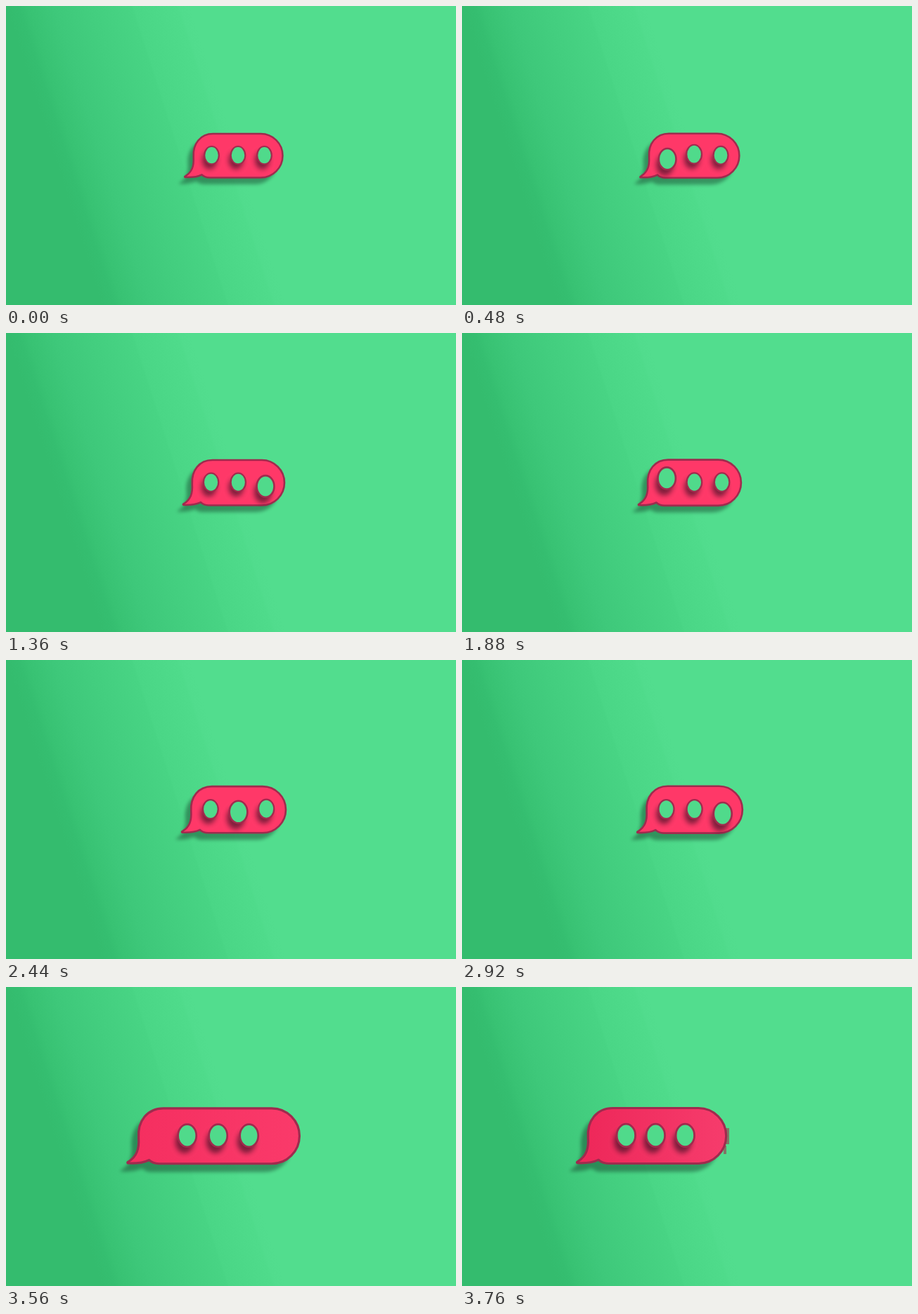
Animation, 640 px wide and 426 px high, one loop 5720 ms. Source, as an HTML page with a canvas:

```html
<!DOCTYPE html>
<html lang="en">
<head>
<meta charset="utf-8">
<title>Typing bubble</title>
<style>
  html, body { margin: 0; width: 100%; height: 100%; overflow: hidden; background: #52dd8e; }
  canvas { display: block; width: 100%; height: 100%; }
</style>
</head>
<body>
<canvas id="stage" width="640" height="426"></canvas>
<script>
const ctx = document.getElementById('stage').getContext('2d');
const LOOP = 5720, STEP = 40, END = 3760;

// Bubble pose: left, right, centre y, scale, dot gap, dot scale, shade
const times = [0, 3000, 3360, 3600, END];
const poses = [
  [266.5, 393.5, 213.3, 1, 37.5, 1, 0],
  [262.3, 399, 213.2, 1.073, 40.2, 1.07, 0],
  [244.3, 407.6, 213.2, 1.17, 44, 1.22, 0],
  [183, 418, 212.2, 1.27, 44, 1.27, 0.7],
  [179, 375.7, 212, 1.265, 42, 1.28, 1]
];

const backdrop = makeBackdrop();

function makeBackdrop() {
  const lean = 0.32, reach = 262, n = reach / (1 + lean * lean);
  const g = ctx.createLinearGradient(0, 0, n, -n * lean);
  const stops = [
    [0, 52, 188, 110], [18, 53, 190, 112], [30, 56, 194, 115],
    [68, 62, 200, 122], [120, 67, 206, 127], [178, 72, 212, 132],
    [181, 74, 214, 134], [243, 79, 219, 139], [247, 81, 220, 141],
    [reach, 82, 221, 142]
  ];
  for (const [u, r, gr, b] of stops) g.addColorStop(u / reach, `rgb(${r},${gr},${b})`);
  return g;
}

// Monotone cubic between poses; the first stretch is linear
function poseAt(t) {
  let i = 0;
  while (i < times.length - 2 && t >= times[i + 1]) i++;
  const span = times[i + 1] - times[i];
  const p = Math.min(1, (t - times[i]) / span);
  const slope = (j, k) => (poses[j + 1][k] - poses[j][k]) / (times[j + 1] - times[j]);
  const tangent = (j, k) => {
    if (j === 0 || j === times.length - 1) return slope(Math.min(j, times.length - 2), k);
    const a = slope(j - 1, k), b = slope(j, k);
    return a * b <= 0 ? 0 : 2 * a * b / (a + b);
  };
  return poses[i].map((a, k) => {
    const b = poses[i + 1][k];
    if (i === 0) return a + (b - a) * p;
    const q = 1 - p;
    return a * (1 + 2 * p) * q * q + b * p * p * (3 - 2 * p)
      + span * (tangent(i, k) * p * q * q - tangent(i + 1, k) * p * p * q);
  });
}

const ease = p => (1 - Math.cos(Math.PI * Math.max(0, Math.min(1, p)))) / 2;

// Each dot hops up, dips down and settles, 400 ms after its neighbour
function hop(t, i) {
  if (t >= 3200) return { dy: 0, grow: 0 };
  const c = (t - i * 400 + 1600) % 1600;
  if (t < i * 400) return { dy: 0, grow: 0 };
  const up = ease(c / 240), down = ease((c - 240) / 280), rest = ease((c - 520) / 240);
  return { dy: -6 * up + 12 * down - 6 * rest, grow: 0.18 * (up - rest) };
}

function setShadow(color, blur, x, y) {
  ctx.shadowColor = color;
  ctx.shadowBlur = blur;
  ctx.shadowOffsetX = x;
  ctx.shadowOffsetY = y;
}

const noShadow = () => setShadow('transparent', 0, 0, 0);

function bubblePath(l, r, cy, s) {
  const h = 31.2 * s;
  const x = v => l + v * s, y = v => cy + v * s;
  ctx.beginPath();
  ctx.moveTo(x(28), cy - h);
  ctx.lineTo(r - h, cy - h);
  ctx.arc(r - h, cy, h, -Math.PI / 2, Math.PI / 2);
  ctx.lineTo(x(23), cy + h);
  ctx.quadraticCurveTo(x(16), y(31), x(12), y(27));
  ctx.bezierCurveTo(x(6), y(30), x(-4), y(31), x(-12), y(30.6));
  ctx.quadraticCurveTo(x(-13), y(29.6), x(-11), y(28.8));
  ctx.bezierCurveTo(x(-2), y(23), x(1), y(15), x(0.2), y(2));
  ctx.bezierCurveTo(x(-1), y(-17), x(10), y(-31.2), x(28), cy - h);
  ctx.closePath();
}

function drawBubble(l, r, cy, s, shade) {
  const fill = ctx.createLinearGradient(l, 0, r, 0);
  fill.addColorStop(0, `rgb(${255 - 17 * shade},${56 - 16 * shade},${104 - 14 * shade})`);
  fill.addColorStop(1, `rgb(${255 - 9 * shade},${56 + 4 * shade},${104 + 4 * shade})`);
  bubblePath(l, r, cy, s);
  ctx.fillStyle = fill;
  setShadow('rgba(15,50,35,0.42)', 5, -8 * s, 9.5 * s);
  ctx.fill();
  noShadow();
  ctx.strokeStyle = '#9f2b4e';
  ctx.lineWidth = 2.5 * s;
  ctx.lineJoin = 'round';
  ctx.stroke();
}

function drawDot(x, y, s) {
  ctx.beginPath();
  ctx.ellipse(x, y, 10.3 * s, 12.7 * s, 0, 0, Math.PI * 2);
  ctx.fillStyle = '#50da8b';
  setShadow('rgba(60,15,35,0.65)', 7, -3 * s, 7 * s);
  ctx.fill();
  noShadow();
  ctx.strokeStyle = '#a02b4e';
  ctx.lineWidth = 2.1 * s;
  ctx.stroke();
}

function draw(t) {
  ctx.fillStyle = backdrop;
  ctx.fillRect(0, 0, 640, 426);
  const [l, r, cy, s, gap, size, shade] = poseAt(Math.min(t, END));
  if (t >= END) {
    ctx.fillStyle = 'rgba(150,75,85,0.7)';
    ctx.fillRect(375, 201, 5, 23);
    ctx.fillRect(372, 226, 4, 12);
  }
  drawBubble(l, r, cy, s, shade);
  const mid = (l + r) / 2 - 2 * shade;
  for (let i = 0; i < 3; i++) {
    const { dy, grow } = hop(t, i);
    drawDot(mid + (i - 1) * gap, cy - 0.6 + dy * s, size * (1 + grow));
  }
}

const start = performance.now();
function tick() {
  const t = (performance.now() - start) % LOOP;
  draw(Math.floor(t / STEP) * STEP);
  requestAnimationFrame(tick);
}
tick();
</script>
</body>
</html>
```
